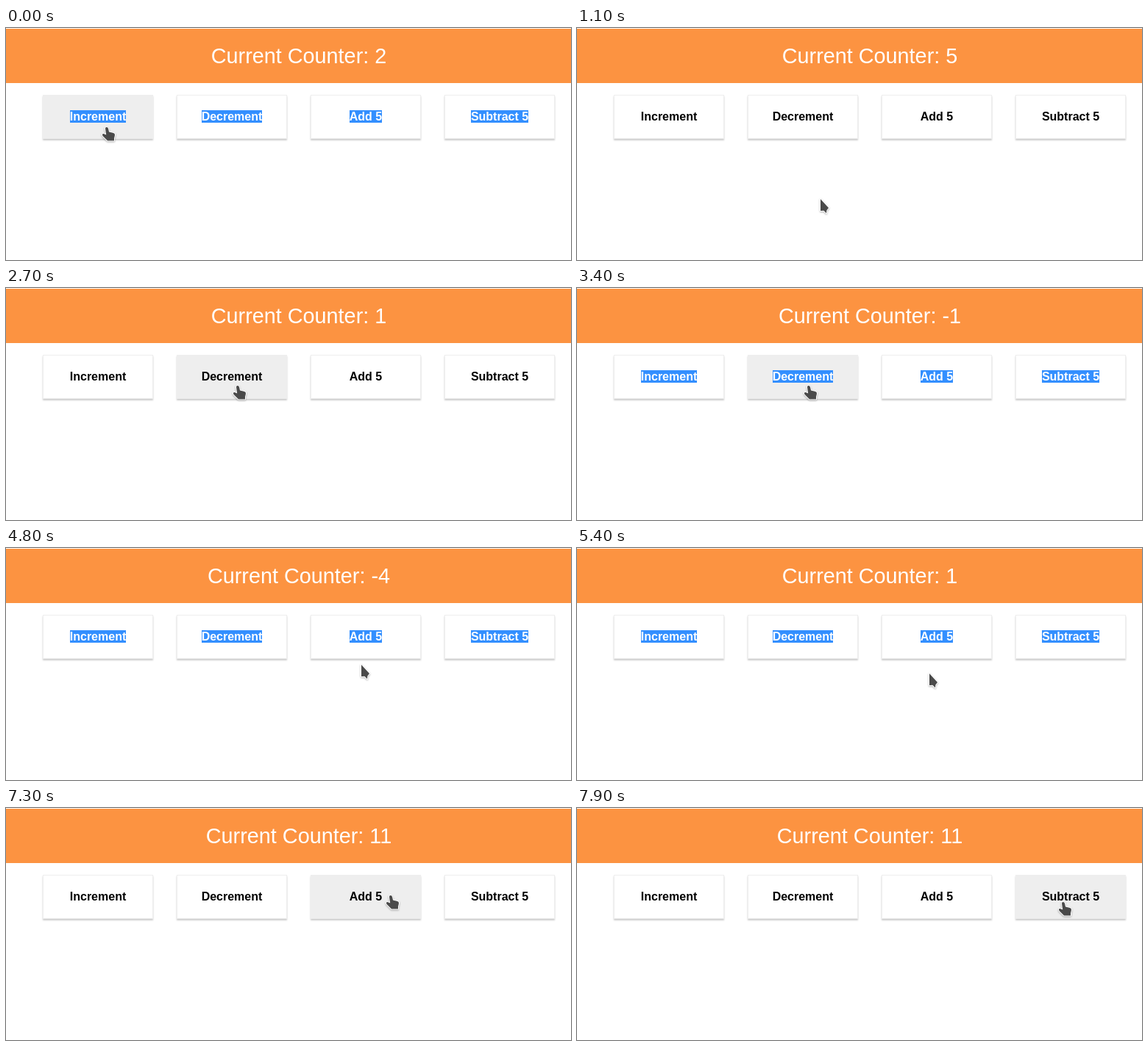
Animation, 768 px wide and 316 px high, one loop 8 s. Source, as an HTML page:

```html
<!DOCTYPE html>
<html lang="en">
<head>
<meta charset="utf-8">
<title>Counter</title>
<style>
  html, body { margin: 0; width: 100%; height: 100%; overflow: hidden; background: #fff; }
  body { position: relative; font: 16px "Liberation Sans", Arial, sans-serif; cursor: none; user-select: none; }
  #output {
    position: absolute; top: 1px; left: 0; width: 768px; height: 74px;
    box-sizing: border-box; padding: 21px 0 0 28px;
    background: #fc9341; color: #fff; font-size: 28.8px; text-align: center;
  }
  .control {
    position: absolute; top: 91px; width: 150px; height: 60px;
    box-sizing: border-box; padding: 20px 0;
    border: 1px solid #eee; box-shadow: 0 2px 2px #ccc;
    font-weight: bold; text-align: center; white-space: pre; color: #000;
  }
  .hover { background: #eee; }
  .selected { background: #338fff; color: #fff; }
  svg { position: absolute; top: 0; left: 0; overflow: visible; filter: drop-shadow(0 1px 1px rgba(0, 0, 0, .3)); }
  path { fill: #4a4a4a; stroke: #fff; stroke-width: 2; stroke-linejoin: round; paint-order: stroke; }
</style>
</head>
<body>
<div id="output"></div>
<svg id="cursor" width="24" height="24"><path id="shape"/></svg>
<script>
const LOOP = 8000, STEP = 100;
const NONE = 0, TO_WORD = 1, ALL = 2;
const ARROW = 'M0 0V16L4.5 15.7 8 19.3 8.4 15.2 11 12Z';
const HAND = 'M-2 2Q-2 0-.3 0 1.5 0 2 2L3 6.5 9 8Q11.3 8.6 11 11L10 15V18.5H1L-5.5 12Q-7 9.3-4.5 9L-.8 10.5Z';

// time, counter, selection
const states = [
  [0, 2, ALL], [100, 3, ALL], [300, 3, NONE], [400, 4, NONE], [500, 5, TO_WORD], [1000, 5, NONE],
  [1900, 4, NONE], [2000, 4, TO_WORD], [2100, 3, TO_WORD], [2200, 3, ALL], [2300, 2, ALL],
  [2700, 1, NONE], [3100, 1, ALL], [3200, 0, ALL], [3400, -1, ALL],
  [3600, -1, NONE], [3700, -2, NONE], [3800, -2, ALL], [3900, -3, ALL], [4100, -4, ALL],
  [5200, 1, ALL], [5600, 1, NONE], [6200, 6, NONE], [6800, 11, NONE]
];

// start, end, x, y
const moves = [
  [0, 0, 137, 135], [700, 800, 322, 224], [900, 1000, 330, 235], [1000, 1100, 331, 233],
  [1200, 1600, 315, 133], [4100, 4400, 478, 252], [4500, 4800, 483, 159], [4800, 5000, 477, 116],
  [5200, 5500, 480, 199], [5600, 6000, 477, 116], [7100, 7900, 661, 128]
];

const output = document.getElementById('output');
const cursor = document.getElementById('cursor');
const shape = document.getElementById('shape');

const add = (parent, tag, text = '') => {
  const el = document.createElement(tag);
  el.textContent = text;
  return parent.appendChild(el);
};

const controls = [['Increment'], ['Decrement'], ['Add', ' 5'], ['Subtract 5']].map((parts, i) => {
  const el = add(document.body, 'div');
  const left = 50 + 182 * i;
  el.className = 'control';
  el.style.left = left + 'px';
  return { el, left, spans: parts.map(part => add(el, 'span', part)) };
});
const spans = controls.flatMap(control => control.spans);
document.body.append(cursor);

function cursorAt(t) {
  let x = 0, y = 0;
  for (const [start, end, toX, toY] of moves) {
    if (t < start) break;
    const k = t >= end ? 1 : (t - start) / (end - start);
    x += (toX - x) * k;
    y += (toY - y) * k;
  }
  return [Math.round(x), Math.round(y)];
}

function render(now) {
  const t = Math.floor(now % LOOP / STEP) * STEP;
  const [, count, selection] = states.findLast(state => state[0] <= t);
  output.textContent = 'Current Counter: ' + count;

  const selectedCount = [0, 3, spans.length][selection];
  spans.forEach((span, i) => span.classList.toggle('selected', i < selectedCount));

  const [x, y] = cursorAt(t);
  let over = false;
  for (const { el, left } of controls) {
    const hit = x >= left && x < left + 150 && y >= 91 && y < 151;
    el.classList.toggle('hover', hit);
    over ||= hit;
  }
  shape.setAttribute('d', over ? HAND : ARROW);
  cursor.style.transform = `translate(${x}px, ${y}px)`;
}

const begin = performance.now();
function tick() {
  render(performance.now() - begin);
  requestAnimationFrame(tick);
}
tick();
</script>
</body>
</html>
```
